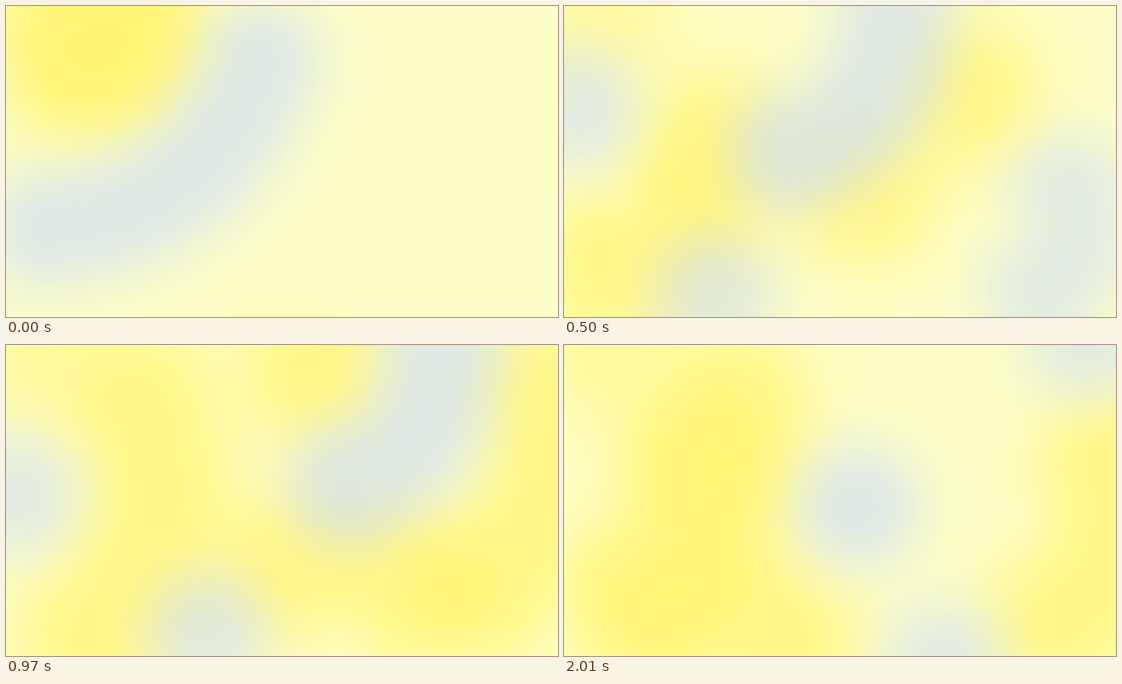
Write an HTML page with a canvas that moves like this. It is 997 by 562 pixels and loops after 2410 ms.

```html
<!DOCTYPE html>
<html lang="en">
<head>
<meta charset="utf-8">
<title>Drifting colours</title>
<style>
  html, body { margin: 0; width: 100%; height: 100%; overflow: hidden; background: #feffc8; }
  canvas { display: block; width: 100vw; height: 100vh; }
</style>
</head>
<body>
<canvas id="stage" width="250" height="141"></canvas>
<script>
const STAGE_W = 997, STAGE_H = 562, LOOP = 2410;
const BASE = [254, 255, 200];
const BOW = .16, SAMPLES = 12;

// A body drifts through its key points, one per beat. On beats with a tail it stretches into a bowed ribbon.
const YELLOW = { color: [255, 244, 110], radius: 125, bodies: [
  { head: [[130, 110], [50, 440], [115, 500], [160, 520], [45, 310], [120, 440]],
    tail: { 0: [240, 35], 1: [330, 290], 3: [245, 110], 4: [235, 360], 5: [310, 105] } },
  { head: [[1200, 200], [640, 90], [800, 220], [870, 430], [970, 360], [900, 495]],
    tail: { 3: [975, 90], 5: [990, 225] } },
  { head: [[500, 750], [450, 110], [630, 550], [740, 440], [660, 500], [395, 535]],
    tail: { 3: [510, 400], 4: [600, 400], 5: [200, 500] } },
  { head: [[180, 70], [170, 370], [375, 130], [560, 50], [430, 70], [230, 210]] },
  { head: Array(6).fill([70, 15]), strength: .45 }
] };
const BLUE = { color: [212, 225, 242], radius: 105, bodies: [
  { head: [[80, 400], [430, 125], [400, 400], [620, 250], [690, 180], [532, 292]],
    tail: { 0: [460, 105], 1: [550, 40], 2: [640, 0], 3: [785, 15], 4: [712, 100] } },
  { head: [[-150, 560], [245, 530], [300, 515], [365, 520], [370, 470], [685, 575]],
    tail: { 4: [30, 535] }, strength: .8 },
  { head: [[-150, 150], [30, 165], [20, 205], [20, 270], [430, 330], [-200, 300]],
    tail: { 4: [220, 150] }, strength: .8 },
  { head: [[1200, 300], [870, 510], [860, 510], [1200, 300], [715, 110], [940, -15]],
    tail: { 1: [865, 130], 2: [960, 550] }, strength: .8 }
] };

// The picture holds from each time on; a fractional beat lies between two key points.
const SCHEDULE = [[0, 0], [130, .5], [300, 1], [500, 1.5], [670, 2], [970, 3], [1340, 4], [1640, 4.5], [2010, 5]];

const canvas = document.getElementById('stage');
const ctx = canvas.getContext('2d');
const picture = ctx.createImageData(canvas.width, canvas.height);
const mix = (a, b, t) => a + (b - a) * t;
const between = (p, q, t) => p.map((v, i) => mix(v, q[i], t));

function ribbonAt({ head, tail = {}, strength = 1 }, beat) {
  const from = Math.floor(beat), to = Math.ceil(beat), t = beat % 1;
  const [x1, y1] = between(head[from], head[to], t);
  const [x2, y2] = between(tail[from] || head[from], tail[to] || head[to], t);
  const count = x1 === x2 && y1 === y2 ? 1 : SAMPLES;
  const points = Array.from({ length: count }, (_, i) => {
    const s = i / (SAMPLES - 1), bow = BOW * 4 * s * (1 - s);
    return [mix(x1, x2, s) - (y2 - y1) * bow, mix(y1, y2, s) + (x2 - x1) * bow];
  });
  return { points, strength };
}

function coverage(ribbons, radius, x, y) {
  let sum = 0;
  for (const { points, strength } of ribbons) {
    let nearest = Infinity;
    for (const [px, py] of points) nearest = Math.min(nearest, (x - px) ** 2 + (y - py) ** 2);
    sum += strength * Math.exp(-((nearest / radius ** 2) ** 1.15));
  }
  return 1 - Math.exp(-1.25 * sum);
}

function draw(beat) {
  const { width, height, data } = picture;
  const layers = [YELLOW, BLUE].map(({ color, radius, bodies }) =>
    ({ color, radius, ribbons: bodies.map(body => ribbonAt(body, beat)) }));
  for (let row = 0, p = 0; row < height; row++) {
    const y = (row + .5) * STAGE_H / height;
    for (let col = 0; col < width; col++, p += 4) {
      const x = (col + .5) * STAGE_W / width;
      let pixel = BASE;
      for (const { color, radius, ribbons } of layers) {
        pixel = between(pixel, color, coverage(ribbons, radius, x, y));
      }
      data.set([...pixel, 255], p);
    }
  }
  ctx.putImageData(picture, 0, 0);
}

const start = performance.now();
let shown = -1;
function tick() {
  const time = (performance.now() - start) % LOOP;
  const beat = SCHEDULE.findLast(([from]) => from <= time)[1];
  if (beat !== shown) draw(shown = beat);
  requestAnimationFrame(tick);
}
tick();
</script>
</body>
</html>
```
